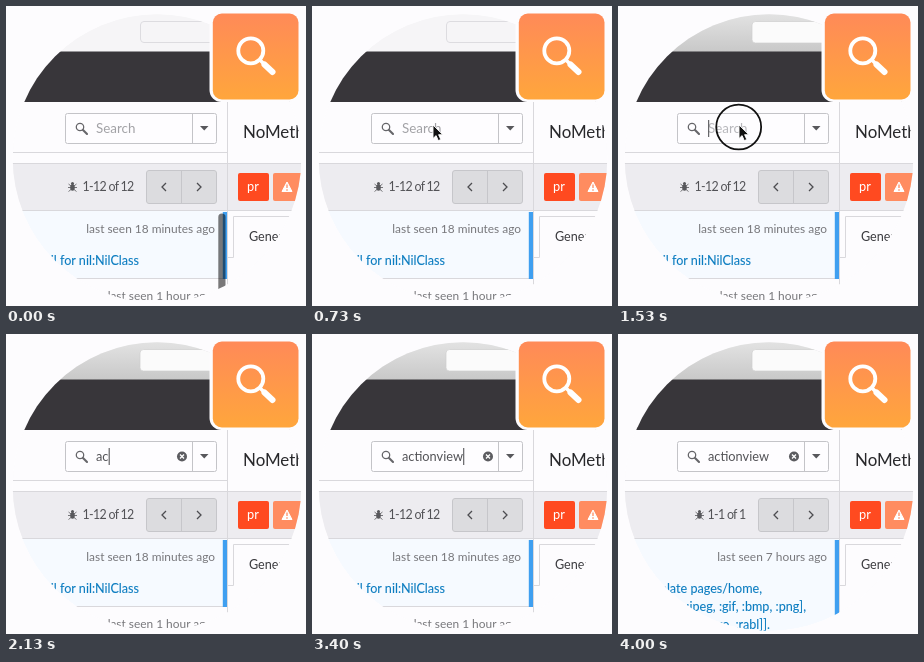
An HTML page for the animation above (4070 ms loop, 300 px wide and 300 px high).

```html
<!DOCTYPE html>
<html lang="en">
<head>
<meta charset="utf-8">
<title>Search demo</title>
<style>
  html, body { margin: 0; width: 100%; height: 100%; overflow: hidden; background: #fdfcfe; }
  svg { display: block; width: 100%; height: 100%; }
  text { font-family: Lato, sans-serif; font-size: 12.8px; fill: #525256; white-space: pre; }
  .meta { font-size: 11.9px; fill: #77777b; text-anchor: end; }
  .link { font-size: 12.6px; fill: #0b7cc0; stroke: #0b7cc0; stroke-width: .1px; text-anchor: end; }
  .count { font-size: 12.4px; letter-spacing: -.7px; text-anchor: end; }
  .rule { stroke: #d9d8dc; fill: none; }
</style>
</head>
<body>
<svg viewBox="0 0 300 300">
  <defs>
    <clipPath id="lens"><circle cx="151" cy="152.5" r="144.3"/></clipPath>
    <linearGradient id="chrome" x2="0" y2="1">
      <stop stop-color="#e8e8e8"/><stop offset="1" stop-color="#c8c8c8"/>
    </linearGradient>
    <linearGradient id="badge" x2="0" y2="1">
      <stop stop-color="#ff8a58"/><stop offset="1" stop-color="#ffa63c"/>
    </linearGradient>
  </defs>

  <g clip-path="url(#lens)">
    <rect width="300" height="300" fill="#fdfcfe"/>

    <!-- browser bar -->
    <rect width="300" height="46" fill="#f6f5f7"/>
    <rect x="134.5" y="15.5" width="120" height="21" rx="3.5" fill="#f6f5f7" stroke="#dddce0"/>
    <g id="active">
      <rect width="300" height="46" fill="url(#chrome)"/>
      <rect x="134" y="15.5" width="120" height="21.5" rx="3.5" fill="#fbfbfb" stroke="#cfcfcf" stroke-width=".7"/>
    </g>
    <rect y="45.5" width="300" height="50.5" fill="#38363a"/>

    <!-- toolbar -->
    <rect y="157" width="300" height="48" fill="#edecf0"/>
    <path class="rule" d="M0 146.5H221M0 157.5H300M0 204.5H300"/>
    <g id="bug" fill="#58585c" stroke="#58585c" stroke-width=".8">
      <ellipse cx="66.500" cy="181.500" rx="2.300" ry="3.300" stroke="none"/>
      <circle cx="66.500" cy="177.500" r="1.500" stroke="none"/>
      <path d="M62.500 178l2.500 2M70.500 178l-2.500 2M62 181.500h9M62.500 185.500l2.500-2M70.500 185.500l-2.500-2" fill="none"/>
    </g>
    <text id="count" class="count" x="127.500" y="185"/>
    <rect x="140.500" y="164.500" width="70" height="33" rx="2.500" fill="#dcdcdf" stroke="#c6c6ca"/>
    <path d="M175.500 165V197" stroke="#c6c6ca"/>
    <path d="M160 177l-4 4 4 4M191 177l4 4-4 4" fill="none" stroke="#4c4c50" stroke-width="1.300"/>

    <!-- detail pane -->
    <path class="rule" d="M221.500 96V280M222 251.500H227.500V210.500H300"/>
    <text x="237" y="132" style="font-size:16.900px;fill:#28282b">NoMethodError</text>
    <rect x="232" y="167" width="31" height="28" rx="2" fill="#ff4a20"/>
    <text x="241" y="185" style="fill:#fff">pr</text>
    <rect x="267" y="167" width="40" height="28" rx="2" fill="#ff8c60"/>
    <path d="M281 176l5 9.500h-10z" fill="#fff" stroke="#fff" stroke-linejoin="round"/>
    <path d="M281 178.500v3.500M281 183.300v1.400" stroke="#ff8c60" stroke-width="1.300"/>
    <text x="243" y="235" style="font-size:12.600px;fill:#3a3a3e">General</text>

    <!-- results -->
    <g id="before">
      <rect y="205" width="221" height="67" fill="#f6faff"/>
      <path class="rule" d="M0 272.500H221"/>
      <rect x="216.800" y="206" width="4.200" height="67" fill="#3f9ff0"/>
      <text class="meta" x="209" y="226.500">last seen 18 minutes ago</text>
      <text class="link" x="133" y="258.500">nil for nil:NilClass</text>
      <text class="meta" x="206" y="294">last seen 1 hour ago</text>
      <rect id="bar" x="212.300" y="207.500" width="7.200" height="80" rx="3.500" fill="#000" fill-opacity=".52"/>
    </g>
    <g id="after">
      <rect y="205" width="221" height="95" fill="#f6faff"/>
      <rect x="216.800" y="206" width="4.200" height="90" fill="#3f9ff0"/>
      <text class="meta" x="209" y="226.500">last seen 7 hours ago</text>
      <text class="link" x="144" y="258.500">template pages/home,</text>
      <text class="link" x="188" y="276.500">:tiff, :jpeg, :gif, :bmp, :png],</text>
      <text class="link" x="152" y="294.500">:ruby, :ro, :rabl]].</text>
    </g>

    <!-- search field -->
    <rect x="59.500" y="107.500" width="151" height="30" rx="2" fill="#fefdff" stroke="#c4c4c8"/>
    <path d="M186.500 108V137" stroke="#c4c4c8"/>
    <path d="M194 120h8.500l-4.250 4.500z" fill="#58585c"/>
    <circle cx="74" cy="121" r="3.700" fill="none" stroke="#66666a" stroke-width="1.300"/>
    <path d="M77 124l4 4" stroke="#66666a" stroke-width="2.100" stroke-linecap="round"/>
    <text id="hint" x="90" y="127" style="font-size:13.400px">Search</text>
    <text id="query" x="90" y="127"/>
    <path id="caret" d="M0 114V131" stroke="#444448"/>
    <g id="clear">
      <circle cx="176" cy="122.500" r="5" fill="#5c5c60"/>
      <path d="M174 120.500l4 4m0-4l-4 4" stroke="#fff" stroke-width="1.300"/>
    </g>
    <circle id="ring" cx="120.700" cy="121" fill="none" stroke="#111" stroke-width="1.800"/>
    <path id="cursor" d="M0 0V13.500L3.100 10.600 5.300 15.600 7.800 14.500 5.600 9.700H9.800Z" fill="#111" stroke="#fff" stroke-width=".9"/>
  </g>

  <!-- badge -->
  <rect x="203.500" y="6" width="91" height="90" rx="12" fill="#fdfcfe"/>
  <rect x="206.800" y="7.500" width="85.700" height="86" rx="9" fill="url(#badge)"/>
  <g fill="none" stroke="#fff" stroke-linecap="round">
    <circle cx="244.800" cy="44.800" r="12.500" stroke-width="3.800"/>
    <path d="M254 54l3 3" stroke-width="3.500"/>
    <path d="M258.500 58.500l8 7.500" stroke-width="6"/>
  </g>
</svg>
<script>
  const LOOP = 4070;
  const WORD = "actionview";
  const KEYS = [1800, 2000, 2330, 2460, 2530, 2660, 2800, 2930, 3000, 3130];
  const ui = {};
  document.querySelectorAll("svg > g [id]").forEach(el => ui[el.id] = el);

  const ramp = (t, from, to) => Math.min(1, Math.max(0, (t - from) / (to - from)));
  const mix = (a, b, k) => a + (b - a) * k;
  const fade = (el, value) => el.setAttribute("opacity", value);
  const show = (el, on) => fade(el, on ? 1 : 0);
  const write = (el, text) => { if (el.textContent !== text) el.textContent = text; };

  function draw(t) {
    const typed = KEYS.filter(k => t >= k).length;
    const found = t >= 3530;

    show(ui.active, t >= 1130);
    fade(ui.bar, 1 - ramp(t, 60, 400));
    fade(ui.before, 1 - ramp(t, 3440, 3640));
    fade(ui.after, ramp(t, 3800, 4000));

    write(ui.count, found ? "1-1 of 1" : "1-12 of 12");
    ui.bug.setAttribute("transform", `translate(${found ? 15 : 0})`);

    write(ui.query, WORD.slice(0, typed));
    show(ui.hint, !typed);
    ui.hint.style.fill = t < 1400 ? "#a2a2a6" : "#b8b8bc";
    show(ui.clear, typed);
    const end = typed ? ui.query.getComputedTextLength() : 0;
    ui.caret.setAttribute("transform", `translate(${90.7 + end})`);
    show(ui.caret, t >= 1400 && t < 3600);

    const k = 1 - (1 - ramp(t, 30, 700)) ** 3;
    ui.cursor.setAttribute("transform", `translate(${mix(300, 121, k)} ${mix(205, 119, k)})`);
    show(ui.cursor, t < KEYS[0]);

    ui.ring.setAttribute("r", mix(14, 24, ramp(t, 1400, 1555)));
    fade(ui.ring, t < 1400 ? 0 : 1 - ramp(t, 1540, 1660));
  }

  const start = performance.now();
  function tick() {
    draw((performance.now() - start) % LOOP);
    requestAnimationFrame(tick);
  }
  tick();
</script>
</body>
</html>
```
